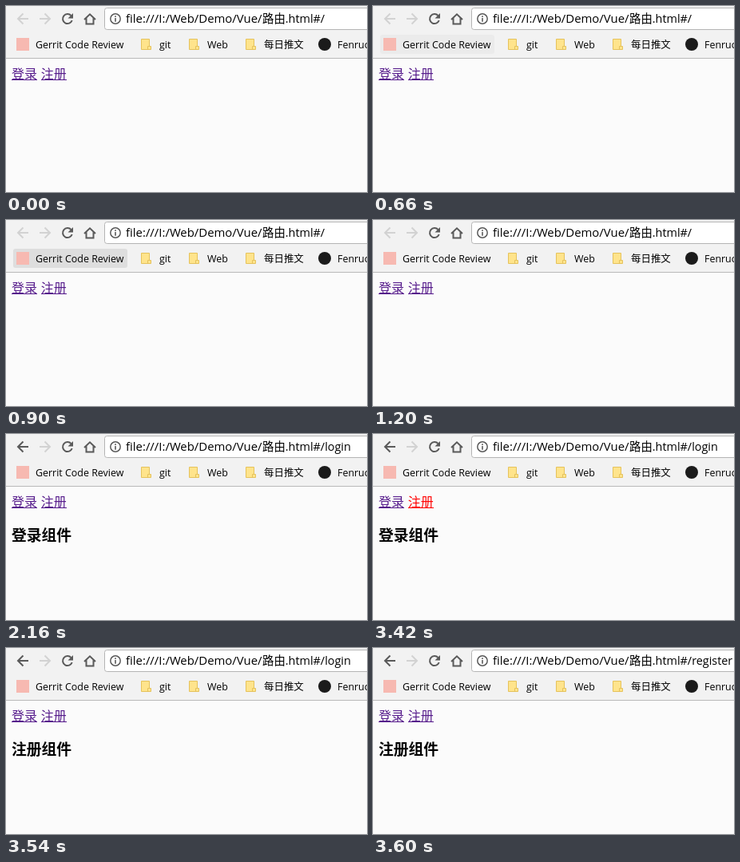
These frames come from a looping animation (452x233 px, 5820 ms). An HTML page:

```html
<!DOCTYPE html>
<html lang="zh-CN">
<head>
<meta charset="utf-8">
<title>路由</title>
<style>
  html, body { margin: 0; width: 100%; height: 100%; overflow: hidden; background: #fbfbfb; }
  svg { display: block; font-family: "Open Sans", "Noto Sans CJK SC", "Noto Sans CJK", sans-serif; }
  .bookmarks { font-size: 12.45px; }
  .icon { fill: none; stroke: #5a5a5a; stroke-width: 2; }
  .off { stroke: #d2d2d2; }
  .folder { fill: #ffe48c; stroke: #e5c25c; }
  .link { font-size: 16px; font-weight: 350; color: #551a8b; fill: currentColor; }
  .link.active { color: #f00; }
  #heading { font-size: 18.8px; font-weight: bold; }
</style>
</head>
<body>
<svg width="452" height="233" viewBox="0 0 452 233">
  <defs>
    <g id="folder" class="folder">
      <path d="M.5 .5H10.5V9.5H12.5V13.5H.5Z"/>
      <path d="M8.5 13V9.5H12" fill="none"/>
    </g>
  </defs>
  <rect width="452" height="233" fill="#fbfbfb"/>
  <rect width="452" height="65" fill="#f2f2f2"/>
  <rect y="65" width="452" height="1" fill="#b9b9b9"/>

  <path id="back" class="icon off" d="M28 16H16M21.5 9.5L15 16L21.5 22.5"/>
  <path class="icon off" d="M42 16H54M48.5 9.5L55 16L48.5 22.5"/>
  <path class="icon" d="M81.5 12A6 6 0 1 0 82.7 18"/>
  <path d="M84 9V15.5H77.5Z" fill="#5a5a5a"/>
  <path class="icon" d="M98 17L105 10.3L112 17M100.5 15V22.5H109.5V15"/>

  <rect x="123.5" y="2.5" width="340" height="27" rx="3" fill="#fff" stroke="#b4b4b4"/>
  <circle cx="137" cy="16" r="6.2" class="icon" style="stroke-width:1.5"/>
  <path d="M136.2 12.3h1.6v1.6h-1.6zM136.2 15h1.6v4.7h-1.6z" fill="#5a5a5a"/>
  <text x="150" y="21" font-size="14.9">file:///I:/Web/Demo/Vue/</text>
  <text x="321" y="21" font-size="14.4">路由.html#/<tspan id="route"></tspan></text>

  <rect id="hover" x="9" y="36" width="143" height="24" rx="3" fill="#dedede"/>
  <g class="bookmarks">
    <rect x="13" y="40" width="16" height="16" fill="#f7b9b1"/>
    <text x="37" y="53">Gerrit Code Review</text>
    <use href="#folder" x="169" y="41"/>
    <text x="192" y="53">git</text>
    <use href="#folder" x="229" y="41"/>
    <text x="252" y="53">Web</text>
    <use href="#folder" x="300" y="41"/>
    <text x="323" y="53">每日推文</text>
    <circle cx="399" cy="48" r="8" fill="#1b1b1b"/>
    <text x="415" y="53">Fenruo</text>
  </g>

  <g id="login" class="link">
    <text x="7" y="91">登录</text><rect x="7" y="92" width="32" height="1"/>
  </g>
  <g id="register" class="link">
    <text x="43.7" y="91">注册</text><rect x="44" y="92" width="32" height="1"/>
  </g>
  <text id="heading" x="7" y="134"></text>
</svg>
<script>
  const LOOP = 5820;
  const $ = id => document.getElementById(id);
  const start = performance.now();

  // Value of the last [time, value] step that has been reached.
  const step = (t, ...steps) => steps.filter(([at]) => t >= at).pop()[1];

  function draw(now) {
    const t = Math.max(0, now - start) % LOOP;
    $("hover").setAttribute("opacity", step(t, [0, 0], [660, .4], [720, .8], [900, 1], [1200, 0]));
    $("login").classList.toggle("active", t >= 2040 && t < 2160);
    $("register").classList.toggle("active", t >= 3420 && t < 3540);
    $("back").classList.toggle("off", t < 2160);
    $("heading").textContent = step(t, [0, ""], [2160, "登录组件"], [3540, "注册组件"]);
    $("route").textContent = step(t, [0, ""], [2160, "login"], [3600, "register"]);
    requestAnimationFrame(draw);
  }
  draw(start);
</script>
</body>
</html>
```
